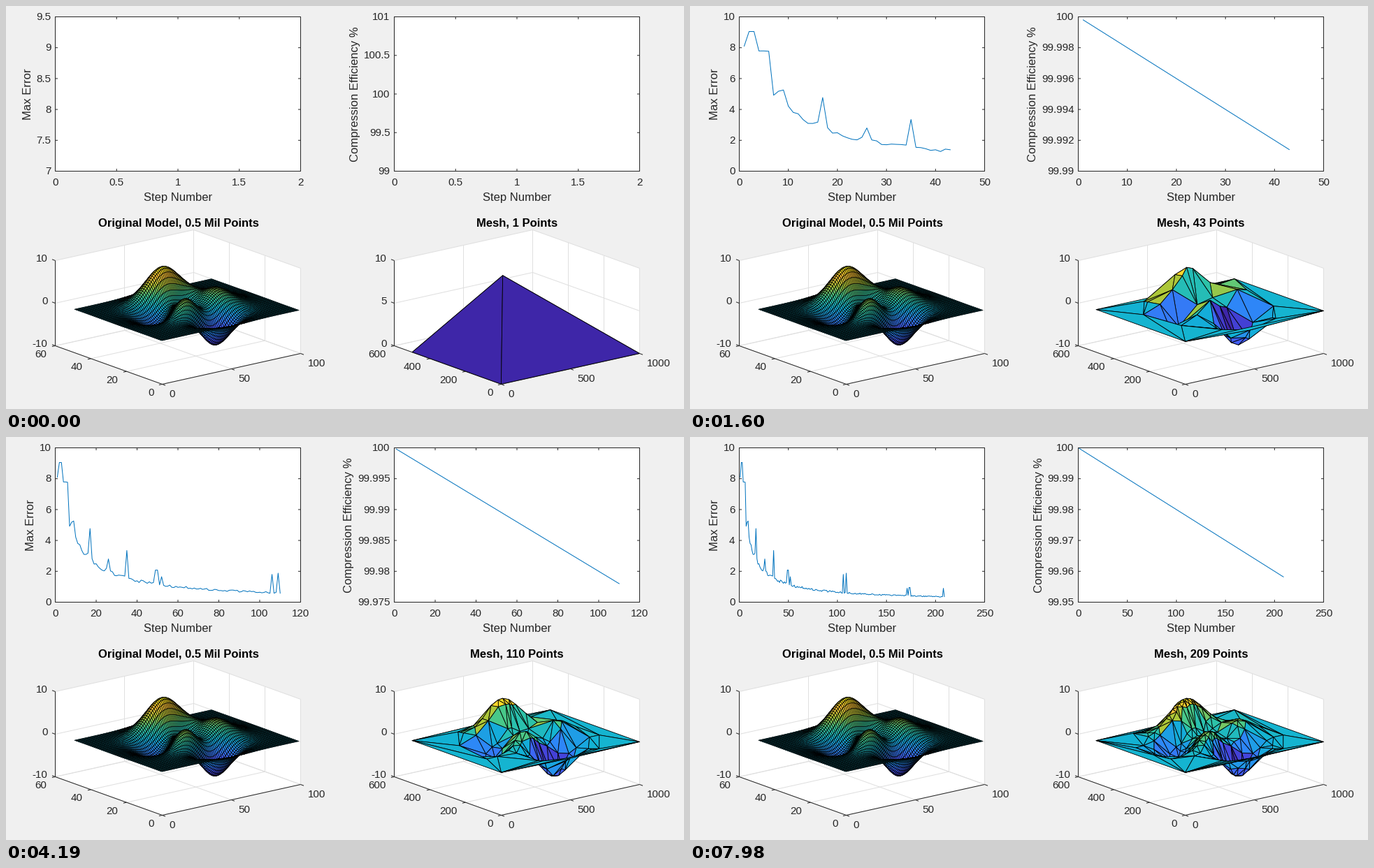
Write a matplotlib script that moves like this. It is 970 by 577 pixels and loops after 8 s.

```python
import math
import random

import numpy as np
import matplotlib.pyplot as plt
from matplotlib.animation import FuncAnimation
from matplotlib.collections import LineCollection, PolyCollection
from matplotlib.colors import LinearSegmentedColormap
from matplotlib.patches import Polygon, Rectangle

plt.rcParams["path.snap"] = False

W, H, DPI = 970, 577, 64
PX = 72 / DPI                      # points per pixel
FRAMES, STEP_MS = 200, 40
LAST = 209
INK, BLUE = "#262626", "#0072BD"
SMALL, LARGE = 15.1, 16.6          # text heights in pixels
BOX_W, BOX_TOP, BOX_BOTTOM = 351, 15, 236
SHIFT = 485                        # distance between left and right panels

PARULA = LinearSegmentedColormap.from_list("parula", [
    (.2422, .1504, .6603), (.2810, .3228, .9579), (.1786, .5289, .9682),
    (.0689, .6948, .8394), (.2161, .7843, .5923), (.6720, .7793, .2227),
    (.9970, .7659, .2199), (.9769, .9839, .0805)])

# Time in ms and points in the mesh
PACE = [(0, 1), (920, 25), (2630, 69), (4190, 110), (5450, 144),
        (6480, 171), (7980, LAST)]


# ---------- data ----------

def peaks(x, y):
    a, b = (x - 1) / 999 * 6 - 3, (y - 1) / 499 * 6 - 3
    return (3 * (1 - a) ** 2 * np.exp(-a ** 2 - (b + 1) ** 2)
            - 10 * (a / 5 - a ** 3 - b ** 5) * np.exp(-a ** 2 - b ** 2)
            - np.exp(-(a + 1) ** 2 - b ** 2) / 3)


def error_curve():
    """A stepped start, then a noisy power-law decay with a few spikes."""
    rng = random.Random(4)
    start = [8.1, 9.05, 9.05, 7.79, 7.79, 7.77, 4.92, 5.18, 5.26]
    spikes = {17: 4.77, 26: 2.8, 35: 3.35, 49: 2.08, 50: 2.08, 52: 1.65,
              106: 1.8, 109: 1.88, 171: .9, 173: .95, 174: .95, 208: .9}
    decay = [4.4 * (10 / i) ** .83 * rng.uniform(.92, 1.08)
             for i in range(len(start) + 1, LAST + 1)]
    curve = np.array(start + decay)
    for i, v in spikes.items():
        curve[i - 1] = v
    return curve


def cross(a, b, x, y):
    return (b[0] - a[0]) * (y - a[1]) - (b[1] - a[1]) * (x - a[0])


def circles(pts, tris):
    t = np.array(tris)
    a = pts[t[:, 0]]
    bx, by = (pts[t[:, 1]] - a).T
    cx, cy = (pts[t[:, 2]] - a).T
    d = 2 * (bx * cy - by * cx)
    b2, c2 = bx ** 2 + by ** 2, cx ** 2 + cy ** 2
    off = np.stack([(cy * b2 - by * c2) / d, (bx * c2 - cx * b2) / d], 1)
    return a + off, (off ** 2).sum(1)


def insert(pts, tris, p):
    """Add one point to a Delaunay mesh; also return the new triangles."""
    centre, r2 = circles(pts, tris)
    hit = ((centre - p) ** 2).sum(1) < r2 * (1 - 1e-9)
    edges = {(t[j], t[(j + 1) % 3])
             for t, h in zip(tris, hit) if h for j in range(3)}
    new = [(a, b, len(pts)) for a, b in sorted(edges)
           if (b, a) not in edges and cross(pts[a], pts[b], *p) > 1e-6]
    kept = [t for t, h in zip(tris, hit) if not h]
    return np.vstack([pts, p]), kept + new, new


def refine(limits):
    """Greedy refinement: add the worst sample while above the curve."""
    gx, gy = [g.ravel() for g in np.meshgrid(np.linspace(1, 1000, 251),
                                             np.linspace(1, 500, 126))]
    gz, est = peaks(gx, gy), np.zeros(gx.size)
    pts = np.array([(1, 1), (1000, 1), (1000, 500), (1, 500)], float)
    tris = [(0, 1, 2), (0, 2, 3)]
    states = []
    for limit in limits:
        miss = abs(gz - est)
        i = int(np.argmax(miss))
        if miss[i] > .9 * limit:
            pts, tris, new = insert(pts, tris, np.array([gx[i], gy[i]]))
            for t in new:
                a, b, c = pts[list(t)]
                area = cross(a, b, *c)
                wa = cross(b, c, gx, gy) / area
                wb = cross(c, a, gx, gy) / area
                wc = 1 - wa - wb
                inside = (wa > -1e-9) & (wb > -1e-9) & (wc > -1e-9)
                za, zb, zc = peaks(*pts[list(t)].T)
                est[inside] = (wa * za + wb * zb + wc * zc)[inside]
        states.append((tris, len(pts)))
    return pts, states


# ---------- drawing helpers ----------

def stage():
    ax = fig.add_axes([0, 0, 1, 1])
    ax.set_xlim(-.5, W - .5)
    ax.set_ylim(H - .5, -.5)
    ax.axis("off")
    return ax


def label(ax, x, y, s, ha="center", size=SMALL, color=INK, **kw):
    if not kw.get("rotation"):
        y += .36 * size - .8               # y is the middle of the capitals
    return ax.text(x, y, s, ha=ha, va="baseline", rotation_mode="anchor",
                   fontsize=size * PX, family="Liberation Sans", color=color,
                   **kw)


def title(ax, x, s):
    return label(ax, x, 310, s, size=LARGE, color="black", weight="bold")


def lines(ax, segs, color=INK):
    return ax.add_collection(
        LineCollection(segs, colors=color, linewidths=PX, zorder=2),
        autolim=False)


def faces(ax, verts, colors, width):
    return ax.add_collection(
        PolyCollection(verts, facecolors=colors, edgecolors="black",
                       linewidths=width * PX, joinstyle="round", zorder=3),
        autolim=False)


def cube(u, v, w, left=0):
    return np.stack([left + 223 + 198 * u - 153 * v,
                     541 - 44 * u - 55 * v - 122 * w + 0 * u], -1)


def room(ax, left, x_ticks, y_ticks):
    def seg(*corners):
        return [cube(*c, left) for c in corners]

    us, vs = np.linspace(0, 1, len(x_ticks)), np.linspace(0, 1, len(y_ticks))
    ws = (0, .5, 1)
    ax.add_patch(Polygon(seg((0, 0, 0), (1, 0, 0), (1, 0, 1), (1, 1, 1),
                             (0, 1, 1), (0, 1, 0)), fc="white", ec="none"))
    grid = [seg((u, 0, 0), (u, 1, 0), (u, 1, 1)) for u in us]
    grid += [seg((0, v, 0), (1, v, 0), (1, v, 1)) for v in vs]
    grid += [seg((0, 1, w), (1, 1, w), (1, 0, w)) for w in ws]
    lines(ax, grid, "#DFDFDF")
    dark = [seg((0, 1, 1), (0, 1, 0), (0, 0, 0), (1, 0, 0))]
    for u, s in zip(us, x_ticks):
        p = cube(u, 0, 0, left)
        dark.append([p, p + (4.5, 1.7)])
        label(ax, p[0] + 10, p[1] + 14, s, "left")
    for v, s in zip(vs, y_ticks):
        p = cube(0, v, 0, left)
        dark.append([p, p + (-4.6, 1)])
        label(ax, p[0] - 12, p[1] + 12, s, "right")
    for w in ws:
        p = cube(0, 1, w, left)
        dark.append([p, p + (-4.5, -1.7)])
    lines(ax, dark)


def z_labels(ax, left, names):
    return [label(ax, left + 59, 486 - 61 * i - 3, s, "right")
            for i, s in enumerate(names)]


def surface(ax):
    x, y = np.meshgrid(np.arange(1, 101), np.arange(1, 51))
    z = peaks(10 * x - 9, 10 * y - 9)
    p = cube(x / 100, y / 60, (z + 10) / 20)
    quads = np.stack([p[:-1, :-1], p[:-1, 1:], p[1:, 1:], p[1:, :-1]], 2)
    shade = (z[:-1, :-1] - z.min()) / (z.max() - z.min())
    faces(ax, quads[::-1, ::-1].reshape(-1, 4, 2),
          PARULA(shade[::-1, ::-1].ravel()), .7)


def nice(lo, hi, most):
    """Rounded limits and ticks with at most so many intervals."""
    for e in range(-5, 3):
        for m in (1, 2, 5):
            s = m * 10.0 ** e
            a, b = math.floor(lo / s + 1e-6), math.ceil(hi / s - 1e-6)
            if b - a <= most:
                return np.arange(a, b + 1) * s


def text_width(s):
    return SMALL * sum(.278 if c == "." else .556 for c in s)


def chart(ax, left, name, data, n, xt, yt):
    def sx(v):
        return left + BOX_W * (v - xt[0]) / (xt[-1] - xt[0])

    def sy(v):
        part = (v - yt[0]) / (yt[-1] - yt[0])
        return BOX_BOTTOM - (BOX_BOTTOM - BOX_TOP) * part

    right, t = left + BOX_W, 3.5
    segs, out = [], []
    for v in xt:
        x = sx(v)
        segs += [[(x, BOX_BOTTOM), (x, BOX_BOTTOM - t)],
                 [(x, BOX_TOP), (x, BOX_TOP + t)]]
        out.append(label(ax, x, 252, f"{v:.6g}"))
    names = [f"{v:.6g}" for v in yt]
    for v, s in zip(yt, names):
        y = sy(v)
        segs += [[(left, y), (left + t, y)], [(right, y), (right - t, y)]]
        out.append(label(ax, left - 6, y, s, "right"))
    out.append(lines(ax, segs))
    edge = left - 6 - max(map(text_width, names)) - 8
    out.append(label(ax, edge, 125.5, name, size=LARGE, rotation=90))
    if n > 1:
        out += ax.plot(sx(np.arange(1, n + 1)), sy(data[:n]),
                       color=BLUE, lw=PX)
    return out


def mesh(ax, n):
    tris, count = states[n - 1]
    z = heights[:count]
    lo, hi = (0, 10) if n == 1 else (-10, 10)
    p = cube(points[:count, 0] / 1000, points[:count, 1] / 600,
             (z - lo) / (hi - lo), SHIFT)
    # Circumcentres along the line of sight give an exact depth order
    centre, _ = circles(points, tris)
    t = np.array(tris)[np.argsort(-centre @ np.array([.255, .198]))]
    # Each face takes the colour of its vertex with the smallest y
    first = t[np.arange(len(t)), np.argmin(points[t, 1], axis=1)]
    shade = (z[first] - z.min()) / (z.max() - z.min())
    return faces(ax, p[t], PARULA(shade), .85)


# ---------- scene ----------

fig = plt.figure(figsize=(W / DPI, H / DPI), dpi=DPI, facecolor="#F0F0F0")
errors = error_curve()
savings = 100 - np.arange(1, LAST + 1) / 5000
points, states = refine(errors)
heights = peaks(*points.T)

# The still parts are drawn once and kept as a backdrop
base = stage()
for left in (70, 70 + SHIFT):
    base.add_patch(Rectangle((left, BOX_TOP), BOX_W, BOX_BOTTOM - BOX_TOP,
                             fc="white", ec=INK, lw=PX))
    label(base, left + BOX_W / 2 + .5, 273.5, "Step Number", size=LARGE)
room(base, 0, ("0", "50", "100"), ("0", "20", "40", "60"))
room(base, SHIFT, ("0", "500", "1000"), ("0", "200", "400", "600"))
z_labels(base, 0, ("-10", "0", "10"))
title(base, 246, "Original Model, 0.5 Mil Points")
surface(base)
fig.canvas.draw()
backdrop = np.array(fig.canvas.buffer_rgba())
base.remove()
fig.figimage(backdrop).set_zorder(-1)

top = stage()
live = []


def update(frame):
    while live:
        live.pop().remove()
    n = int(np.interp(frame * STEP_MS + 30, *zip(*PACE)) + 1e-6)
    if n == 1:
        xt = np.arange(0, 2.1, .5)
        ya, yb = np.arange(7, 9.6, .5), np.arange(99, 101.1, .5)
    else:
        xt = nice(1, n, 7)
        ya = nice(errors[:n].min(), errors[:n].max(), 6)
        yb = nice(savings[n - 1], savings[0], 6)
    live.extend(chart(top, 70, "Max Error", errors, n, xt, ya))
    live.extend(chart(top, 70 + SHIFT, "Compression Efficiency %", savings,
                      n, xt, yb))
    live.extend(z_labels(top, SHIFT, ("0", "5", "10") if n == 1
                         else ("-10", "0", "10")))
    live.append(title(top, 730.5, f"Mesh, {n} Points"))
    live.append(mesh(top, n))
    return live


anim = FuncAnimation(fig, update, frames=FRAMES, interval=STEP_MS,
                     init_func=lambda: [], repeat=True, repeat_delay=0)
plt.show()
```
